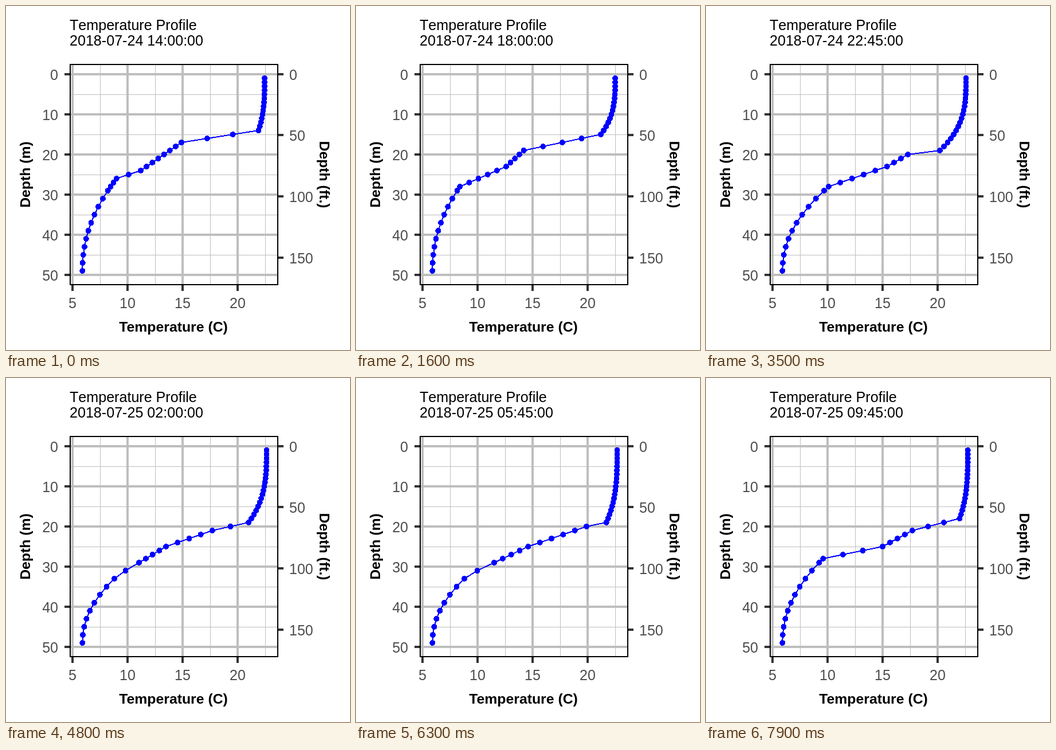
Write an HTML page that moves like this. It is 600 by 600 pixels and loops after 8000 ms.

```html
<!DOCTYPE html>
<html lang="en">
<head>
<meta charset="utf-8">
<title>Temperature Profile</title>
<style>
  html, body { margin: 0; width: 100%; height: 100%; overflow: hidden; background: #fff; }
  svg { display: block; width: 100vw; height: 100vh; }
  line, rect, circle, polyline { shape-rendering: crispEdges; }
  text { font: 25px "Liberation Sans", Arial, sans-serif; font-kerning: none; }
  .title { font-size: 25.1px; }
  .axis { font-size: 24.8px; font-weight: bold; text-anchor: middle; font-kerning: normal; }
  .tick { fill: #4d4d4d; }
</style>
</head>
<body>
<svg id="stage" viewBox="0 0 600 600"></svg>
<script>
const STEP_MS = 100, STEPS = 80, MINUTES = 15;
const START = Date.UTC(2018, 6, 24, 14);
const LEFT = 112, RIGHT = 474, TOP = 102, BOTTOM = 486, TICK_LENGTH = 10;
const GRID = "#bebebe", TICK = "#333", BLUE = "#00f";
const stage = document.getElementById("stage");

const tempX = c => 116 + (c - 5) * 19.2;
const depthY = m => 119 + m * 7;
const mix = (a, b, u) => a + (b - a) * u;

function add(tag, attrs, text) {
  const el = document.createElementNS("http://www.w3.org/2000/svg", tag);
  for (const key in attrs) el.setAttribute(key, attrs[key]);
  if (text !== undefined) el.textContent = text;
  stage.appendChild(el);
  return el;
}
const line = (x1, y1, x2, y2, stroke, width) =>
  add("line", { x1, y1, x2, y2, stroke, "stroke-width": width });
const label = (x, y, text, cls, extra) =>
  add("text", { x, y, class: cls, ...extra }, text);

// Sensors sit every metre down to 29 m, then every second metre.
const SURFACE = 1, FLOOR = 49;
const depths = [];
for (let d = SURFACE; d <= FLOOR; d += d < 29 ? 1 : 2) depths.push(d);

// Bends of the thermocline as [depth, temperature]: foot of the warm layer,
// foot of the steep drop, middle, and start of the cold layer.
const bends = [
  { step: 0, at: [[14, 21.9], [17, 14.9], [24, 11.2], [26, 9]] },
  { step: 16, at: [[15, 21.2], [19, 14.2], [23, 12.6], [28, 8.4]] },
  { step: 26, at: [[17, 20.2], [19, 16.1], [25, 12.2], [29, 8.6]] },
  { step: 35, at: [[19, 20.2], [20, 17.3], [23, 15.4], [28, 10.1]] },
  { step: 48, at: [[19, 21], [21, 17.7], [25, 13.5], [32, 9.2]] },
  { step: 63, at: [[19, 21.7], [20, 19.9], [25, 14.6], [32, 9.2]] },
  { step: 79, at: [[18, 22], [21, 17.7], [25, 15], [28, 9.6]] }
];

function bendsAt(step) {
  const next = Math.max(1, bends.findIndex(b => b.step >= step));
  const a = bends[next - 1], b = bends[next];
  const u = (step - a.step) / (b.step - a.step);
  return a.at.map(([d, c], k) => [mix(d, b.at[k][0], u), mix(c, b.at[k][1], u)]);
}

// Warm layer falls off slowly, thermocline is straight between bends,
// cold layer levels out towards the floor.
function temperature(depth, points, step) {
  const warm = 22.45 + 0.3 * step / STEPS, cold = 5.9;
  const [top, topTemp] = points[0], [base, baseTemp] = points[points.length - 1];
  if (depth <= top) return mix(warm, topTemp, ((depth - SURFACE) / (top - SURFACE)) ** 3);
  if (depth >= base) return mix(cold, baseTemp, ((FLOOR - depth) / (FLOOR - base)) ** 2.1);
  const k = points.findIndex(p => p[0] >= depth);
  const [d0, c0] = points[k - 1], [d1, c1] = points[k];
  return mix(c0, c1, (depth - d0) / (d1 - d0));
}

for (let c = 7.5; c < 23; c += 5) {
  const x = Math.round(tempX(c)) + 0.5;
  line(x, TOP, x, BOTTOM, GRID, 1);
}
for (let m = 5; m < 50; m += 10) line(LEFT, depthY(m) + 0.5, RIGHT, depthY(m) + 0.5, GRID, 1);
for (let c = 5; c <= 20; c += 5) {
  const x = tempX(c);
  line(x, TOP, x, BOTTOM, GRID, 4);
  line(x, BOTTOM, x, BOTTOM + TICK_LENGTH + 1, TICK, 4);
  label(x, 527, c, "tick", { "text-anchor": "middle" });
}
for (let m = 0; m <= 50; m += 10) {
  const y = depthY(m);
  line(LEFT, y, RIGHT, y, GRID, 4);
  line(LEFT - TICK_LENGTH, y, LEFT, y, TICK, 4);
  label(91, y + 10, m, "tick", { "text-anchor": "end" });
}
for (let ft = 0; ft <= 150; ft += 50) {
  const y = Math.floor(depthY(ft * 0.3048));
  line(RIGHT, y, RIGHT + TICK_LENGTH, y, TICK, 4);
  label(494, y + 10, ft, "tick");
}

const curve = add("polyline", { fill: "none", stroke: BLUE, "stroke-width": 2 });
const dots = depths.map(d => add("circle", { cy: depthY(d), r: 5, fill: BLUE }));
add("rect", { x: LEFT, y: TOP, width: RIGHT - LEFT, height: BOTTOM - TOP,
  fill: "none", stroke: "#000", "stroke-width": 2 });

label(111, 42, "Temperature Profile", "title");
const clock = label(111, 69, "", "title");
label(292, 568, "Temperature (C)", "axis");
label(0, 0, "Depth (m)", "axis", { transform: "translate(42 294) rotate(-90)" });
label(0, 0, "Depth (ft.)", "axis", { transform: "translate(547 294) rotate(90)" });

function render(ms) {
  const step = Math.floor(ms / STEP_MS) % STEPS;
  const points = bendsAt(step);
  const xs = depths.map(d => tempX(temperature(d, points, step)));
  dots.forEach((dot, k) => dot.setAttribute("cx", xs[k]));
  curve.setAttribute("points", xs.map((x, k) => x + "," + depthY(depths[k])).join(" "));
  const date = new Date(START + step * MINUTES * 60000);
  clock.textContent = date.toISOString().slice(0, 19).replace("T", " ");
}

const began = performance.now();
function tick() {
  render(performance.now() - began);
  requestAnimationFrame(tick);
}
tick();
</script>
</body>
</html>
```
